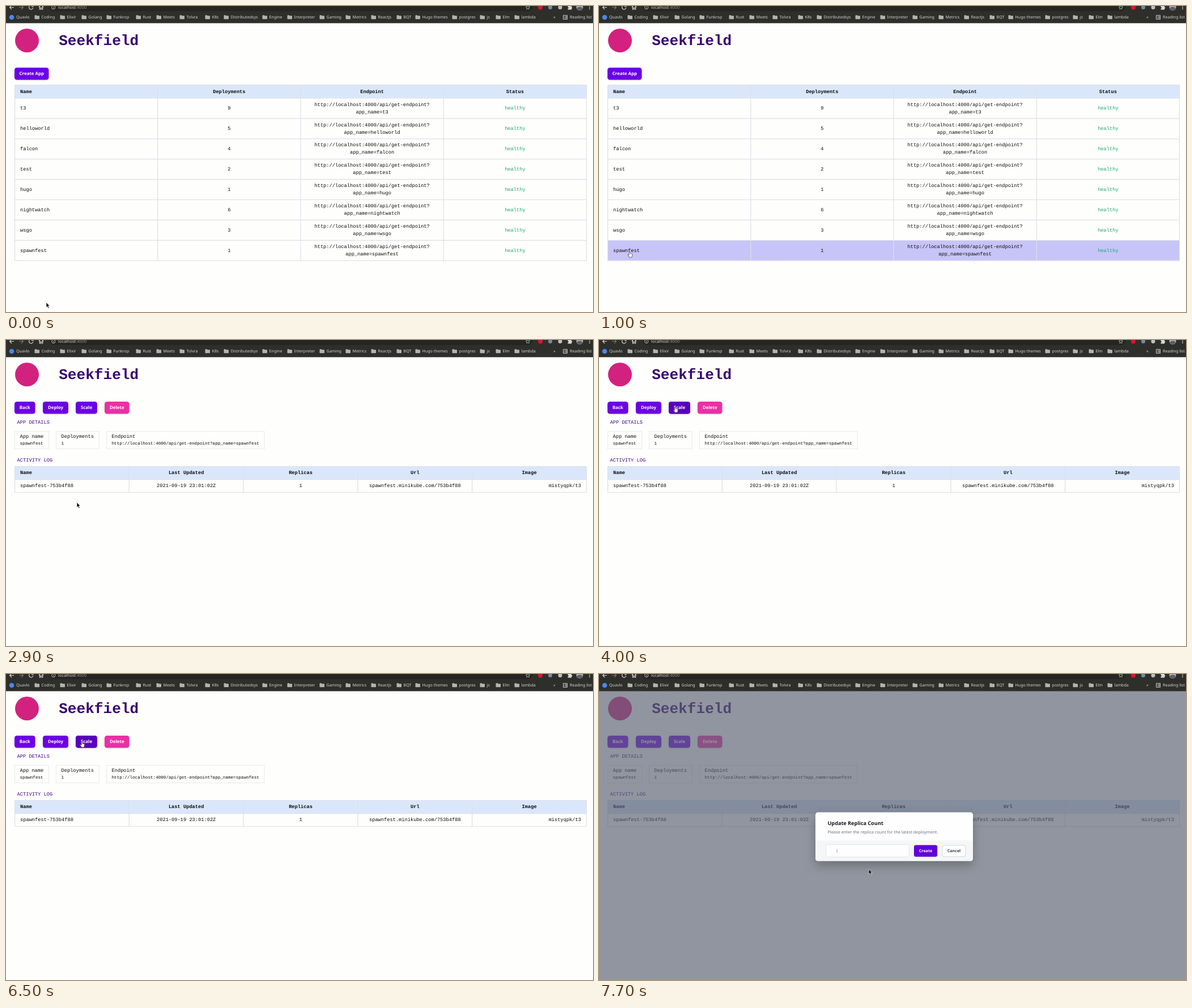
An HTML page for the animation above (8000 ms loop, 1036x541 px).

```html
<!DOCTYPE html>
<html lang="en">
<head>
<meta charset="utf-8">
<title>App dashboard</title>
<style>
  html, body { margin: 0; width: 100%; height: 100%; overflow: hidden; background: #fefefc; }
  svg { display: block; width: 100vw; height: 100vh; }
  text { white-space: pre; text-rendering: geometricPrecision; }

  .mono { font: 8.7px "Liberation Mono", monospace; fill: #0b0b0d; }
  .small { font-size: 7.61px; }
  .bold { font-weight: 700; }
  .title { font: 700 26.1px "Liberation Mono", monospace; fill: #38066f; }
  .section { fill: #430089; }
  .healthy { fill: #1ba577; }
  .sans { font: 7.1px "Noto Sans", "Open Sans", sans-serif; fill: #d3d3cf; }
  .button { font: 600 7.9px "Noto Sans", "Open Sans", sans-serif; fill: #fff; }
  .compact { font-size: 7.1px; }
  .dark { fill: #374151; }
  .dialog-title { font: 600 9.1px "Noto Sans", "Open Sans", sans-serif; fill: #14171f; }
  .hint { font-size: 7.4px; fill: #6b7280; }
  .url { font-size: 7.4px; }
  .port { fill: #92928e; }
  .raised { filter: drop-shadow(0 1.5px 1.5px rgba(0, 0, 0, .12)); }
  .floating { filter: drop-shadow(0 8px 9px rgba(0, 0, 0, .25)); }

  #list, #row-hover, #details, #scale-hover, #dialog, #cursor, #arrow, #hand {
    animation: 8s step-end infinite;
  }
  #list { animation-name: list; }
  #details { animation-name: details; }
  #row-hover { animation-name: row-hover; }
  #scale-hover { animation-name: scale-hover; }
  #dialog { animation-name: dialog; }
  #cursor { animation-name: move; }
  #arrow { animation-name: arrow; }
  #hand { animation-name: hand; }

  @keyframes list { 0% { visibility: visible } 21.25%, 100% { visibility: hidden } }
  @keyframes details { 0% { visibility: hidden } 21.25%, 100% { visibility: visible } }
  @keyframes row-hover { 0% { opacity: 0 } 11.25% { opacity: 1 } 21.25%, 100% { opacity: 0 } }
  @keyframes scale-hover { 0% { opacity: 0 } 45% { opacity: 1 } 88.75%, 100% { opacity: 0 } }
  @keyframes dialog { 0% { visibility: hidden } 87.5%, 100% { visibility: visible } }
  @keyframes hand {
    0% { opacity: 0 } 11.25% { opacity: 1 } 21.25% { opacity: 0 }
    45% { opacity: 1 } 46.25% { opacity: 0 } 50% { opacity: 1 } 95%, 100% { opacity: 0 }
  }
  @keyframes arrow {
    0% { opacity: 1 } 11.25% { opacity: 0 } 21.25% { opacity: 1 }
    45% { opacity: 0 } 46.25% { opacity: 1 } 50% { opacity: 0 } 95%, 100% { opacity: 1 }
  }
  @keyframes move {
    0% { transform: translate(71px, 524px) }
    7.5% { transform: translate(70px, 510px) }
    8.75% { transform: translate(67px, 485px) }
    10% { transform: translate(62px, 459px) }
    11.25% { transform: translate(57px, 441px) }
    12.5% { transform: translate(54px, 433.5px) }
    21.25% { transform: translate(52.7px, 435px) }
    28.75% { transform: translate(62px, 415px) }
    30% { transform: translate(104px, 352px) }
    31.25% { transform: translate(146px, 312px) }
    32.5% { transform: translate(126.5px, 300px) }
    36.25% { transform: translate(125px, 287px) }
    37.5% { transform: translate(122.5px, 275px) }
    40% { transform: translate(118px, 132px) }
    41.25% { transform: translate(114.5px, 251px) }
    43.75% { transform: translate(128px, 180px) }
    45% { transform: translate(134px, 118px) }
    46.25% { transform: translate(122.5px, 161px) }
    48.75% { transform: translate(128px, 138px) }
    50% { transform: translate(134.5px, 117.5px) }
    78.75% { transform: translate(133px, 118.5px) }
    80% { transform: translate(132.5px, 119px) }
    81.25% { transform: translate(133.8px, 119px) }
    95% { transform: translate(330px, 240px) }
    96.25%, 100% { transform: translate(476px, 345px) }
  }
</style>
</head>
<body>
<svg viewBox="0 0 1036 541">
  <rect width="1036" height="541" fill="#fefefc"/>
  <g id="header"><circle cx="37" cy="61" r="21" fill="#d3217f"/></g>
  <g id="list"></g>
  <g id="details"></g>
  <g id="dialog">
    <rect y="30" width="1036" height="511" fill="#5c6373" opacity=".68"/>
    <rect class="floating" x="382" y="244.5" width="278" height="86" rx="4.5" fill="#fefefe"/>
    <path d="M382 294.5h278v31.500a4.500 4.500 0 0 1-4.500 4.500h-269a4.500 4.500 0 0 1-4.500-4.500z" fill="#f5f6f7"/>
    <rect x="400.5" y="301.5" width="147" height="22" rx="3.3" fill="#fefefe" stroke="#e3e5e9"/>
    <rect class="raised" x="556" y="302.5" width="41" height="20.5" rx="3.3" fill="#6200d6"/>
    <rect x="606" y="303" width="41" height="20" rx="3.3" fill="#fefefe" stroke="#d1d5db"/>
  </g>
  <g id="browser">
    <rect width="1036" height="30.4" fill="#2e2e2b"/>
    <path d="M76 0h854q-2 9-8 9H84q-6 0-8-9z" fill="#252522"/>
    <g fill="none" stroke="#d8d8d4" stroke-width="1.1">
      <path d="M14 2.5H6.500M10 -1L6.500 2.500L10 6"/>
      <path d="M23 2.5h7.500M27 -1l3.500 3.500L27 6" stroke="#777773"/>
      <path d="M47 0a3.600 3.600 0 1 0 .8 3M48 -2v3h-3"/>
      <path d="M58 2l4-4 4 4M59.300 1v5h1.700V3h2v3h1.700V1"/>
      <circle cx="83.7" cy="2.5" r="3.2" stroke-width=".8"/>
      <path d="M83.700 2v2.500M83.700 .5v.8" stroke-width=".8"/>
      <path d="M921 -1l1.100 2.300 2.500.3-1.900 1.700.5 2.500-2.200-1.200-2.200 1.200.5-2.500-1.900-1.700 2.500-.3z" stroke-width=".7"/>
      <path d="M983.500 16.500h7v7h-7zM985 18.500h1M987 18.500h2.500M985 20h1M987 20h2.500M985 21.500h1M987 21.500h2.500" stroke-width=".9"/>
    </g>
    <circle cx="10" cy="20" r="4.3" fill="#4d86ea"/>
    <circle cx="943" cy="2.5" r="4" fill="#d9182d"/>
    <circle cx="960.5" cy="2.5" r="3.5" fill="#718ba8"/>
    <circle cx="978" cy="2.5" r="3.5" fill="#b9c1c2"/>
    <path d="M991.500 0h2a1.300 1.300 0 0 1 2.600 0h2v2a1.300 1.300 0 0 1 0 2.600v2h-6.600v-2a1.300 1.300 0 0 0 0-2.600z" fill="#d8d8d4"/>
    <circle cx="1012.5" cy="2" r="6" fill="#a6adb5"/>
    <path d="M1007.500 5a5 3.500 0 0 1 10 0a6 6 0 0 1-10 0z" fill="#595f66"/>
    <g fill="#d8d8d4"><circle cx="1030" cy="2" r=".9"/><circle cx="1030" cy="5" r=".9"/></g>
  </g>
  <g id="cursor">
    <path id="arrow" d="M0 0v9l2-1.800 1.500 3.300 1.500-.7-1.500-3.200h2.700z" fill="#111" stroke="#fff" stroke-width=".6"/>
    <path id="hand" d="M-.9 .8q.9-1.500 1.800 0v3.300q.8-.6 1.500 .1 .8-.4 1.300.3 1-.2 1 .9v2.400q0 1-.7 1.900v1.100H-.8V9.700L-3.100 6.800q-.3-1.200.8-1.100l1.400 1.200z" fill="#fff" stroke="#111" stroke-width=".6"/>
  </g>
</svg>
<script>
const NS = 'http://www.w3.org/2000/svg';
const [header, list, details, dialog, browser] =
  ['header', 'list', 'details', 'dialog', 'browser'].map(id => document.getElementById(id));

function add(parent, tag, attrs, content = '') {
  const node = document.createElementNS(NS, tag);
  for (const key in attrs) node.setAttribute(key, attrs[key]);
  node.textContent = content;
  return parent.appendChild(node);
}

const text = (parent, x, y, content, cls, anchor = 'start') =>
  add(parent, 'text', { x, y, class: cls, 'text-anchor': anchor }, content);

const box = (parent, x, y, width, height, attrs) =>
  add(parent, 'rect', { x, y, width, height, ...attrs });

function button(parent, x, width, label, fill = '#6c00e5') {
  box(parent, x, 109, width, 21.5, { rx: 4.3, fill, class: 'raised' });
  if (label === 'Scale') {
    box(parent, x, 109, width, 21.5, { rx: 4.3, fill: '#5800bb', id: 'scale-hover' });
  }
  text(parent, x + width / 2, 122.4, label, 'button', 'middle');
}

// Header band plus equal rows, ruled by one path; returns the column centres.
function grid(parent, top, columns, rows, rowHeight, hoverLast) {
  const left = 15.5, width = 1009, head = 23.2;
  const bottom = top + head + rows * rowHeight;
  const step = width / columns.length;
  box(parent, left, top, width, head, { fill: '#dae7fb' });
  if (hoverLast) {
    box(parent, left, bottom - rowHeight, width, rowHeight, { fill: '#c7c4f8', id: 'row-hover' });
  }
  let d = `M${left} ${top}h${width}`;
  for (let i = 0; i <= rows; i++) d += `M${left} ${top + head + i * rowHeight}h${width}`;
  for (let i = 0; i <= columns.length; i++) d += `M${left + i * step} ${top}V${bottom}`;
  add(parent, 'path', { d, stroke: '#dedfe7', 'stroke-width': 1.2, fill: 'none' });
  const center = i => left + (i + .5) * step;
  columns.forEach((name, i) =>
    text(parent, i ? center(i) : 25, top + 13.9, name, 'mono bold', i ? 'middle' : 'start'));
  return center;
}

text(header, 93.2, 68.7, 'Seekfield', 'title');

// Application list
const endpoint = 'http://localhost:4000/api/get-endpoint?';
const apps = [['t3', 9], ['helloworld', 5], ['falcon', 4], ['test', 2],
  ['hugo', 1], ['nightwatch', 6], ['wsgo', 3], ['spawnfest', 1]];
button(list, 15, 60.5, 'Create App');
const listCenter = grid(list, 139.8, ['Name', 'Deployments', 'Endpoint', 'Status'], apps.length, 35.9, true);
apps.forEach(([name, count], i) => {
  const y = 183.2 + i * 35.9;
  text(list, 25, y, name, 'mono');
  text(list, listCenter(1), y, count, 'mono', 'middle');
  text(list, listCenter(2), y - 6.6, endpoint, 'mono', 'middle');
  text(list, listCenter(2), y + 6.4, 'app_name=' + name, 'mono', 'middle');
  text(list, listCenter(3), y, 'healthy', 'mono healthy', 'middle');
});

// Application details
button(details, 15, 36.5, 'Back');
button(details, 65, 45, 'Deploy');
button(details, 123, 38, 'Scale');
button(details, 174, 43.5, 'Delete', '#ec2fa5');
text(details, 19.6, 148.3, 'APP DETAILS', 'mono section');
text(details, 19.6, 214.6, 'ACTIVITY LOG', 'mono section');
[[15.5, 60, 'App name', 'spawnfest'],
 [88.5, 75.7, 'Deployments', '1'],
 [177.5, 278.5, 'Endpoint', endpoint + 'app_name=spawnfest']].forEach(([x, width, label, value]) => {
  box(details, x, 161.5, width, 31, { fill: 'none', stroke: '#e8e9ec' });
  text(details, x + 9, 172.8, label, 'mono');
  text(details, x + 9, 184.8, value, 'mono small');
});
const logCenter = grid(details, 223.5, ['Name', 'Last Updated', 'Replicas', 'Url', 'Image'], 1, 22.8);
['2021-09-19 23:01:02Z', '1', 'spawnfest.minikube.com/753b4f88'].forEach((value, i) =>
  text(details, logCenter(i + 1), 260.4, value, 'mono', 'middle'));
text(details, 25, 260.4, 'spawnfest-753b4f88', 'mono');
text(details, 1015, 260.4, 'mistyqpk/t3', 'mono', 'end');

// Replica dialog
text(dialog, 403.5, 267.2, 'Update Replica Count', 'dialog-title');
text(dialog, 403.5, 282.4, 'Please enter the replica count for the latest deployment.', 'sans hint');
text(dialog, 417.8, 315.5, '1', 'sans hint');
text(dialog, 576.5, 315.1, 'Create', 'button compact', 'middle');
text(dialog, 626.5, 315.1, 'Cancel', 'button compact dark', 'middle');

// Browser bar
text(browser, 92, 5.2, 'localhost', 'sans url');
text(browser, 142.3, 5.2, ':4000', 'sans url port', 'end');
text(browser, 18, 22.4, 'Quavlo', 'sans');
text(browser, 966, 22.4, '»', 'sans bold');
text(browser, 995, 22.4, 'Reading list', 'sans');
[['Coding', 63], ['Elixir', 108], ['Golang', 146], ['Funkrop', 190], ['Rust', 242], ['Meets', 278],
 ['Tolvra', 319], ['K8s', 364], ['Distributedsys', 397], ['Engine', 465], ['Interpreter', 509],
 ['Gaming', 566], ['Metrics', 612], ['Reactjs', 657], ['BQT', 702], ['Hugo themes', 735],
 ['postgres', 800], ['js', 849], ['Elm', 877], ['lambda', 910]].forEach(([name, x]) => {
  add(browser, 'path', { d: `M${x - 12.5} 17q0-.8.8-.8h2.400l1 1h3.500q.8 0 .8.8v4.500q0 .8-.8.8h-6.900q-.8 0-.8-.8z`, fill: '#b4b4af' });
  text(browser, x - .4, 22.4, name, 'sans');
});
</script>
</body>
</html>
```
